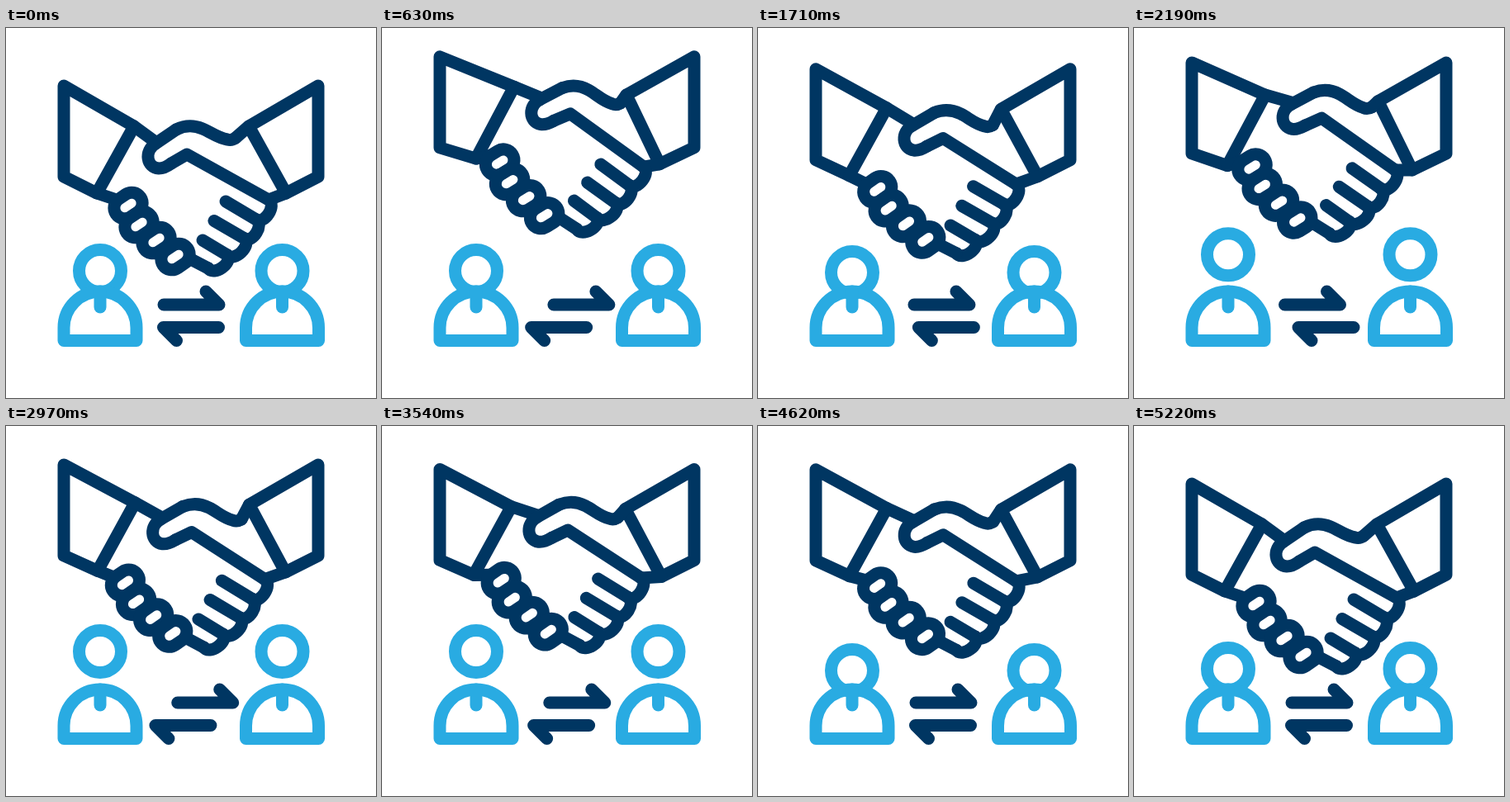
An HTML page with a canvas that plays this animation: 448x448 px, repeating every 5400 ms.

```html
<!DOCTYPE html>
<html lang="en">
<head>
<meta charset="utf-8">
<title>Handshake</title>
<style>
html, body { margin: 0; width: 100%; height: 100%; overflow: hidden; background: #fff; }
canvas { display: block; width: 448px; height: 448px; }
</style>
</head>
<body>
<canvas id="stage" width="448" height="448"></canvas>
<script>
const ctx = document.getElementById('stage').getContext('2d');
const NAVY = '#003662', BLUE = '#29abe2';
const LOOP = 5400, STEP = 30, END = 5220;
const SHAKES = 4;

const clamp = x => Math.max(0, Math.min(1, x));
const ramp = (a, b, t) => (1 - Math.cos(Math.PI * clamp((t - a) / (b - a)))) / 2;
const plateau = (a, b, c, d, t) => ramp(a, b, t) - ramp(c, d, t);

// One up-and-down beat per shake; the last one is half as high.
function beat(t) {
  const height = t < END * (SHAKES - 1) / SHAKES ? 1 : .5;
  return height * (1 - Math.cos(2 * Math.PI * SHAKES * t / END)) / 2;
}

// Maps a point by turning it around (cx, cy) and then shifting it.
function move(angle, cx, cy, dx, dy) {
  const c = Math.cos(angle), s = Math.sin(angle);
  return ([x, y]) => [
    cx + (x - cx) * c - (y - cy) * s + dx,
    cy + (x - cx) * s + (y - cy) * c + dy
  ];
}

function line(points, closed) {
  ctx.beginPath();
  points.forEach(p => ctx.lineTo(...p));
  if (closed) ctx.closePath();
  ctx.stroke();
}

// Strokes a start point followed by cubic segments of three points each.
function curve(points, map) {
  const [first, ...rest] = points.map(map);
  ctx.beginPath();
  ctx.moveTo(...first);
  for (let i = 0; i < rest.length; i += 3) {
    ctx.bezierCurveTo(...rest[i], ...rest[i + 1], ...rest[i + 2]);
  }
  ctx.stroke();
}

function knuckle(x, y, map) {
  const tilt = -.6, half = 5, r = 13;
  const [ax, ay] = map([x - half * Math.cos(tilt), y - half * Math.sin(tilt)]);
  const [bx, by] = map([x + half * Math.cos(tilt), y + half * Math.sin(tilt)]);
  const side = Math.atan2(by - ay, bx - ax) + Math.PI / 2;
  ctx.beginPath();
  ctx.arc(bx, by, r, side - Math.PI, side);
  ctx.arc(ax, ay, r, side, side + Math.PI);
  ctx.closePath();
  ctx.stroke();
}

function drawFingers(map) {
  const tips = [[318, 208], [303, 232], [289, 255], [268, 275], [245, 291]];
  const bulge = .42;
  for (let i = 1; i < tips.length; i++) {
    const [x0, y0] = tips[i - 1], [x1, y1] = tips[i];
    const nx = (y1 - y0) * bulge, ny = (x0 - x1) * bulge;
    curve([[x0, y0], [x0 + nx, y0 + ny], [x1 + nx, y1 + ny], [x1, y1]], map);
    const root = [280 - 14 * i, 186.5 + 23.5 * i];
    line([tips[i], i < 4 ? root : [222, 279]].map(map));
  }
}

function drawHands(t) {
  const active = Math.min(1, 3 * Math.sin(Math.PI * t / END));
  const pace = t - 60 * Math.sin(2 * Math.PI * t / END);
  const lift = -36 * beat(pace);
  const swing = 10 * active - 63 * beat(pace - 40 * active);

  const hand = move(.035 * active - .0017 * swing, 224, 228, 0, swing);
  const fingers = move(-.08 * active - .0036 * swing, 255, 250, -5 * active, .94 * swing);
  const knuckles = move(-.06 * active - .0022 * swing, 177, 247, .14 * swing, 1.04 * swing);

  // cuffs
  const bend = (Math.min(0, swing) / 50) ** 2;
  const leftTop = [155 + 5 * bend, 119 + lift - 13 * bend];
  const leftLow = [110 + 4 * bend, 200 + lift - 7 * bend];
  const rightTop = [294 + 2 * bend, 119 + lift - 3 * bend];
  const rightLow = [339 - 3 * bend, 200 + lift];
  line([[70, 70 + lift], leftTop, leftLow, [70, 180 + lift]], true);
  line([[378, 70 + lift], rightTop, rightLow, [378, 180 + lift]], true);

  // wrists
  line([leftTop, hand([181, 138])]);
  line([leftLow, knuckles([134, 208])]);
  line([rightTop, hand([278, 133])]);
  line([fingers([318, 208]), rightLow]);

  // back of the hand, then the thumb
  curve([[278, 133], [274, 136], [271, 136], [268, 135], [256, 133], [248, 126], [238, 122],
    [226, 117], [216, 118], [206, 123]], hand);
  line([[206, 123], [181, 140]].map(hand));
  curve([[181, 140], [167, 149], [170, 169], [185, 170], [191, 170], [196, 167], [200, 164]], hand);
  line([hand([200, 164]), hand([219, 153]), fingers([318, 208])]);

  drawFingers(fingers);
  for (const [x, y] of [[148, 215], [161, 238], [182, 257], [205, 277]]) knuckle(x, y, knuckles);
}

function drawArrow(x, y, dir) {
  line([[x - 67 * dir, y], [x, y], [x - 16 * dir, y - 16 * dir]]);
}

function drawPerson(x, headY) {
  ctx.beginPath();
  ctx.arc(x, headY, 25.5, 0, 2 * Math.PI);
  ctx.stroke();
  ctx.beginPath();
  ctx.arc(x, 363, 44, Math.PI, 0);
  ctx.lineTo(x + 44, 378.5);
  ctx.lineTo(x - 44, 378.5);
  ctx.closePath();
  ctx.stroke();
  line([[x, 319], [x, 338]]);
}

function draw(t) {
  ctx.fillStyle = '#fff';
  ctx.fillRect(0, 0, 448, 448);
  ctx.lineWidth = 15;
  ctx.lineCap = ctx.lineJoin = 'round';

  ctx.strokeStyle = NAVY;
  drawHands(t);
  const out = plateau(0, 750, 3100, 4200, t);
  const back = plateau(750, 2180, 2180, 3100, t);
  drawArrow(258 + 18 * out - 26.5 * back, 335, 1);
  drawArrow(190.5 - 10.5 * out + 19 * back, 362.5, -1);

  ctx.strokeStyle = BLUE;
  const dip = plateau(1500, 1700, 4600, 5100, t);
  const rise = plateau(1700, 2280, 3750, 4600, t);
  const headY = 294 + 2 * dip - 23 * rise;
  drawPerson(114, headY);
  drawPerson(334.5, headY);
}

const start = performance.now();
function tick() {
  const t = (performance.now() - start) % LOOP;
  draw(Math.min(END, Math.floor(t / STEP) * STEP));
  requestAnimationFrame(tick);
}
tick();
</script>
</body>
</html>
```
